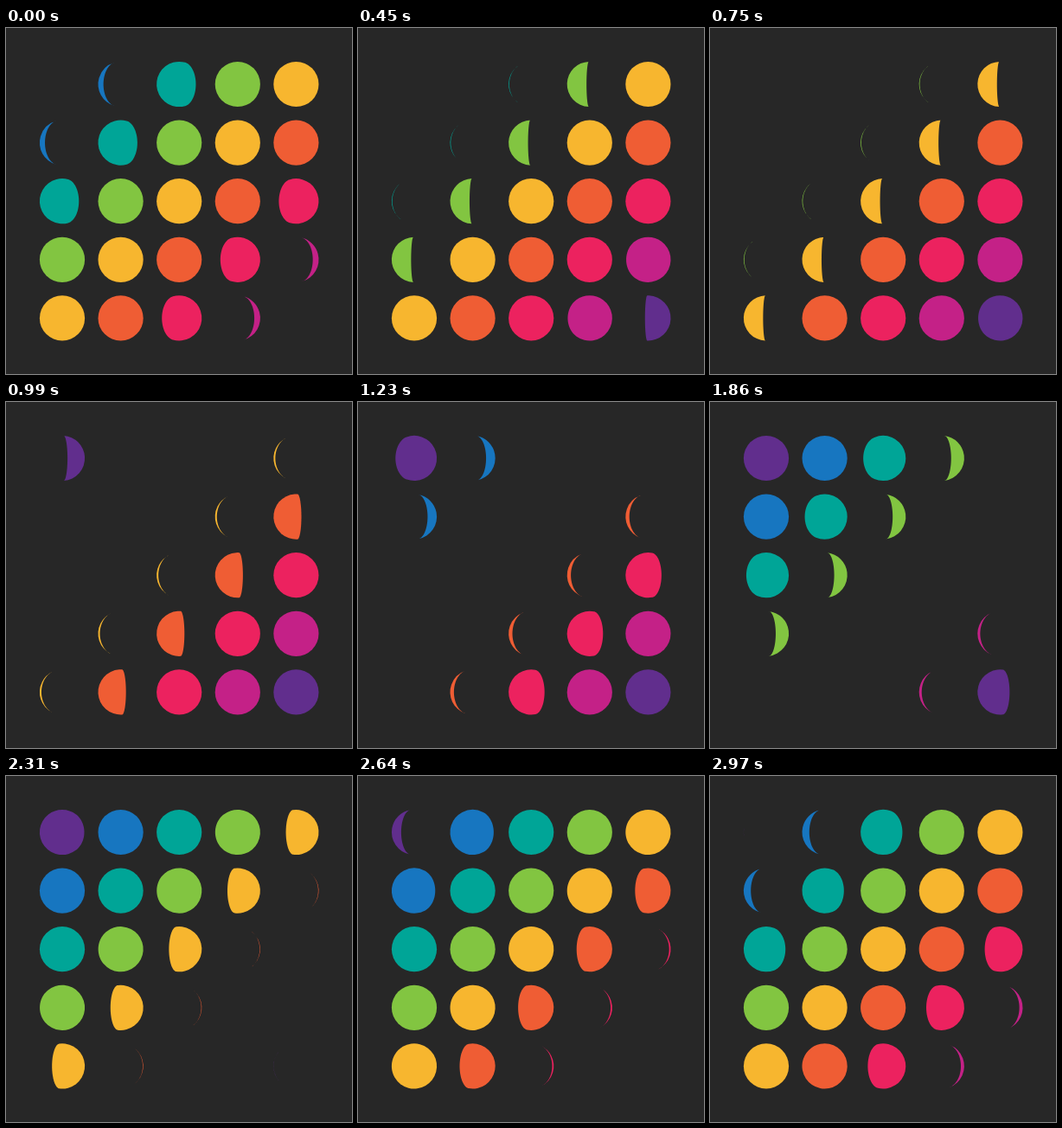
Write an HTML page with a canvas that moves like this. It is 400 px wide and 400 px high and loops after 3000 ms.

```html
<!DOCTYPE html>
<html>
<head>
<meta charset="utf-8">
<style>
html, body { margin: 0; width: 100%; height: 100%; overflow: hidden; background: #272727; }
canvas { display: block; width: 400px; height: 400px; }
</style>
</head>
<body>
<canvas width="400" height="400"></canvas>
<script>
const ctx = document.querySelector('canvas').getContext('2d');
const COLORS = ['#612e8d', '#1776c0', '#00a597', '#82c541', '#f7b62f',
                '#ef5d34', '#ec225f', '#c42187', '#612e8d'];
const LOOP = 3000, HALF = LOOP / 2, STAGGER = 300, LEAD = 912;
const R = 26.1, DEPTH = 0.37; // DEPTH: sphere radius / camera distance
const LIMIT = Math.acos(DEPTH), SCALE = R * Math.sqrt(1 - DEPTH * DEPTH);

const bezier = (a, b, s) => 3 * a * s * (1 - s) ** 2 + 3 * b * s * s * (1 - s) + s ** 3;

function ease(p) {
  let lo = 0, hi = 1;
  for (let i = 0; i < 24; i++) {
    const mid = (lo + hi) / 2;
    if (bezier(0.25, 0.25, mid) < p) lo = mid; else hi = mid;
  }
  return bezier(0.1, 1, lo);
}

// A half-painted sphere seen in perspective, its edge turned by angle.
function moon(cx, cy, angle, waxing) {
  ctx.beginPath();
  if (Math.abs(angle) >= LIMIT) {
    if ((angle < 0) !== waxing) return;
    ctx.arc(cx, cy, R, 0, 2 * Math.PI);
  } else {
    const end = Math.acos(DEPTH / Math.cos(angle));
    let x, y;
    for (let i = -20; i <= 20; i++) {
      const phi = end * i / 20;
      const k = SCALE / (1 - DEPTH * Math.cos(phi) * Math.cos(angle));
      x = k * Math.cos(phi) * Math.sin(angle);
      y = k * Math.sin(phi);
      ctx.lineTo(cx + x, cy + y);
    }
    const tip = Math.atan2(y, x);
    ctx.arc(cx, cy, R, tip, -tip, waxing);
  }
  ctx.fill();
}

function draw(time) {
  ctx.fillStyle = '#272727';
  ctx.fillRect(0, 0, 400, 400);
  for (let d = 0; d < 9; d++) {
    const local = (time + LEAD - d * STAGGER + LOOP) % LOOP;
    const angle = Math.PI * (0.5 - ease(local % HALF / HALF));
    ctx.fillStyle = COLORS[d];
    for (let col = Math.max(0, d - 4); col <= Math.min(4, d); col++) {
      moon(65 + 67.6 * col, 65 + 67.6 * (d - col), angle, local >= HALF);
    }
  }
}

const start = performance.now();
function tick() {
  draw((performance.now() - start) % LOOP);
  requestAnimationFrame(tick);
}
tick();
</script>
</body>
</html>
```
